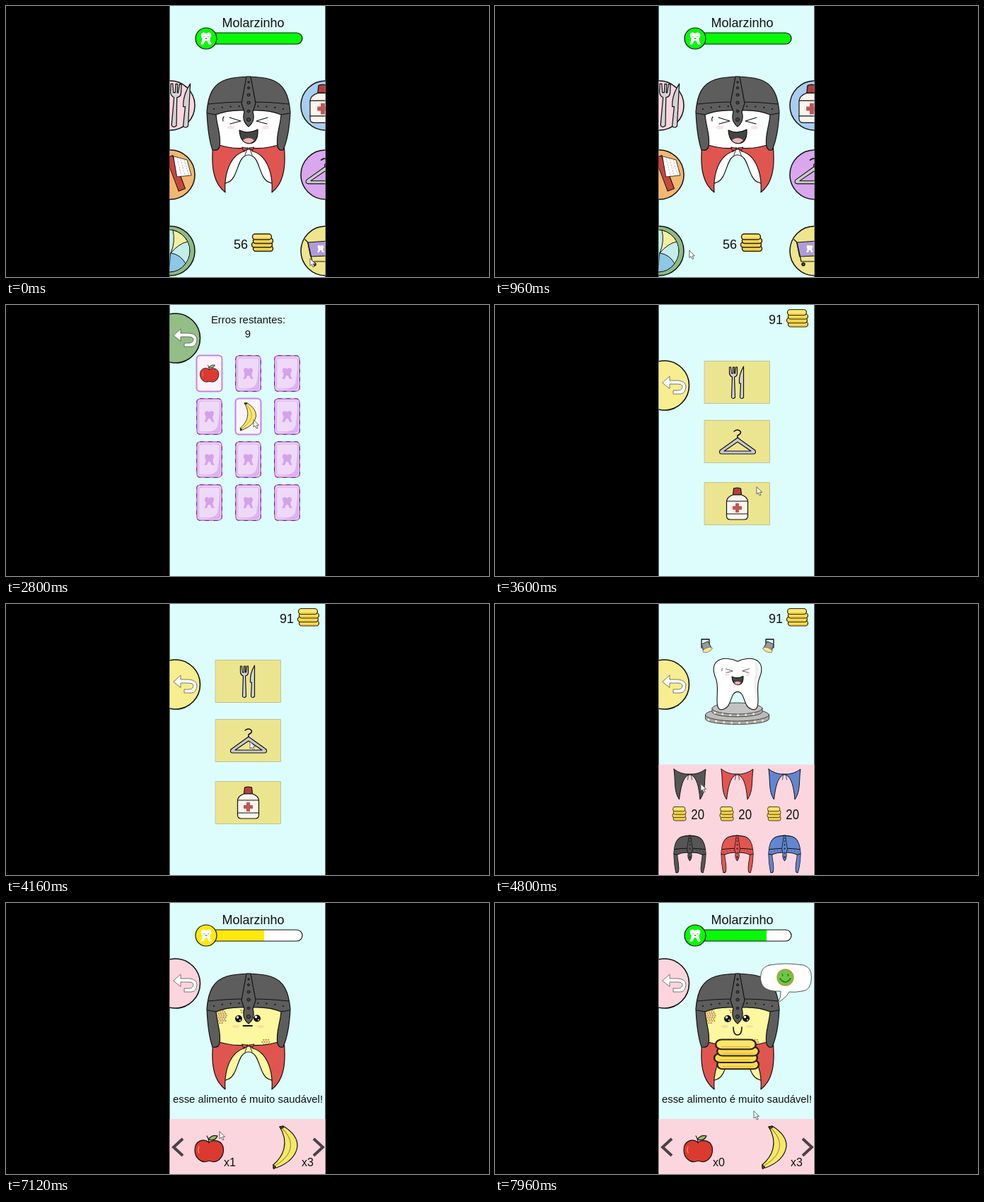
Recreate the animation shown at these times as an HTML page. Size 683 by 384 pixels, loop 8 s.

```html
<!DOCTYPE html>
<html lang="pt">
<head>
<meta charset="utf-8">
<title>Dente virtual</title>
<style>
  html, body { margin: 0; width: 100%; height: 100%; overflow: hidden; background: #000; }
  svg { display: block; width: 100vw; height: 100vh; }
  text { font: 18px "Liberation Sans", Arial, sans-serif; fill: #111; stroke: none; }
  .mid { text-anchor: middle; }
  .small { font-size: 14.9px; }
  .none { stroke: none; }
  .line { fill: none; }
</style>
</head>
<body>
<svg viewBox="0 0 683 384" stroke="#111" stroke-width="1.2" stroke-linejoin="round" stroke-linecap="round">
<defs>
  <clipPath id="phone"><path d="M231.500 0h220v384h-220z"/></clipPath>

  <path id="body" d="M343 141C330 134 312 132 300 138C286 145 285 162 293 180C300 197 295 215 296 236C297 252 303 255 313 250C329 246 326 211 343 211C360 211 357 246 373 250C383 255 389 252 390 236C391 215 386 197 393 180C401 162 400 145 386 138C374 132 356 134 343 141Z"/>
  <path id="mini" class="none" d="M0 -7Q-4 -10-7 -7Q-8 -3-5.500 0Q-5 4-8 8Q-4 10-3 7Q-2 3 0 3Q2 3 3 7Q4 10 8 8Q5 4 5.500 0Q8 -3 7 -7Q4 -10 0 -7Z"/>

  <g id="cape" fill="currentColor">
    <path id="capeSide" d="M293 194Q318 204 342 201L337 206C318 211 308 236 310 264C292 250 290 225 293 194Z"/>
    <use href="#capeSide" transform="matrix(-1 0 0 1 686 0)"/>
    <path d="M334 200l8 2 9-2-2 4-6-1-7 2zM341 203l-3 8M345 203l3 8" stroke-width=".9"/>
  </g>

  <g id="helmet" fill="currentColor">
    <path d="M284 150C286 125 293 110 312 104C330 99 356 99 374 104C394 110 400 128 402 150C401 172 398 190 392 204Q386 206 384 199C381 185 388 170 389 154Q372 147 350 148H336Q314 147 297 154C298 170 305 185 302 199Q300 206 292 204C287 190 285 172 284 150Z"/>
    <path class="line" d="M286 139Q312 136 335 136M351 136Q374 136 400 139M285 152l12 2M401 152l-12 2"/>
    <path d="M340 100h6L353 138L349 150Q353 163 343 171Q333 163 337 150L333 138Z"/>
    <g fill="#444" stroke-width=".9">
      <circle cx="343" cy="108" r="1.2"/><circle cx="343" cy="116" r="1.6"/><circle cx="343" cy="126" r="2"/>
      <circle cx="343" cy="137" r="2.200"/><circle cx="343" cy="149" r="1.8"/><circle cx="343" cy="161" r="2.600"/>
      <path class="line" stroke-width="2.200" stroke-dasharray="0 12" d="M294 146Q312 142 333 142M392 146Q374 142 353 142"/>
    </g>
  </g>

  <g id="laugh">
    <path class="line" d="M316 158l16 5-15 4M370 158l-16 5 15 4M307 163q-1-4 1-6" stroke-width="1.1"/>
    <g class="none" fill="#fde0e3"><ellipse cx="318" cy="172" rx="5" ry="2.6"/><ellipse cx="367" cy="172" rx="5" ry="2.6"/></g>
    <path fill="#444" d="M330 176Q343 182 356 175Q357 194 344 195Q331 194 330 176Z"/>
    <path class="none" fill="#f3b5b5" d="M335 190Q343 184 351 190Q347 195 343 194Q338 194 335 190Z"/>
  </g>

  <g id="eyes" class="none">
    <circle cx="329" cy="164" r="5" fill="#111"/><circle cx="355" cy="163.500" r="5" fill="#111"/>
    <g fill="#fff"><circle cx="327.500" cy="162" r="1.700"/><circle cx="353.500" cy="161.500" r="1.700"/><circle cx="331" cy="166" r="1"/><circle cx="357" cy="165.500" r="1"/></g>
    <g fill="#f6e0a0"><ellipse cx="325" cy="175" rx="5" ry="2"/><ellipse cx="360" cy="175" rx="5" ry="2"/></g>
  </g>

  <g id="coins" fill="#f7dc55" stroke="#2c2208">
    <rect x="-13" y="5" width="28" height="7.500" rx="3.700"/>
    <rect x="-15" y="-.5" width="29" height="7.500" rx="3.700"/>
    <rect x="-13" y="-6" width="28" height="7.500" rx="3.700"/>
    <rect x="-14" y="-12" width="27" height="8" rx="4" fill="#fae56c"/>
    <path class="line" stroke="#eeb53c" stroke-width=".8" d="M-9 10.500h20M-11 5h20M-9 -.5h20M-10 -6h19"/>
  </g>

  <g id="cutlery" fill="#d3d3d6">
    <path d="M-12 -22v9q1 4 4 5l-1 29q2 3 5 0l-1-29q4-1 4-5v-9l-2 0-1 9-1 0v-9h-2v9h-2l-1-9z"/>
    <path d="M8 -23q-7 12-6 24h2l-1 20q2 3 5 0z"/>
  </g>
  <g id="hanger">
    <path fill="#c9c9cc" fill-rule="evenodd" d="M0 -6L25 12Q27 17 22 17H-22Q-27 17-25 12ZM0 0L-19 13H19Z"/>
    <path class="line" stroke-width="1.600" d="M0 -6v-3q6-3 4-6-4-4-9 0"/>
  </g>
  <g id="bottle">
    <path fill="#b5403f" d="M-5 -22Q0 -24 5 -22L6 -13H-6Z"/>
    <path fill="#fbf6ee" d="M-6 -13H6Q15 -10 15 -3V17Q15 22 10 22H-10Q-15 22-15 17V-3Q-15 -10-6 -13Z"/>
    <path class="line" d="M-15 -4h30M-15 14h30"/>
    <path class="none" fill="#c25656" d="M-2.500 -1h5v4h4v5h-4v4h-5v-4h-4v-5h4z"/>
  </g>
  <g id="apple">
    <path fill="#db3a30" d="M0 -9C-8 -15-20 -11-20 2C-20 13-11 21-2 18Q0 17 3 18C12 21 21 12 20.500 1C20 -11 8 -14 0 -9Z"/>
    <path class="line" d="M0 -8Q0 -14-3 -18"/>
    <path fill="#8fca62" d="M-1 -13Q4 -20 12 -18Q9 -10-1 -13Z"/>
    <path class="line" stroke="#f08a7c" d="M-14 -3q-2 5 0 9"/>
  </g>
  <g id="banana">
    <path fill="#f6e86a" d="M-8 -29L-3 -30Q18 -17 17 -1Q14 19-12 29L-17 30L-17 25C-3 13 6 -6-8 -29Z"/>
    <path class="line" stroke="#a89530" d="M-5 -27Q15 -8 3 11Q-4 20-14 26"/>
    <path fill="#4b3d1c" stroke-width=".8" d="M-17 25l4 3-3 3zM-8 -29l5-1 1 2-4 2z"/>
  </g>

  <g id="back">
    <circle r="35" cx="-.5" fill="currentColor" stroke-width="1.600"/>
    <path fill="#fff" stroke="#444" stroke-width=".7" d="M-3 -4L7 -13V-7H19Q30 -6 30 2Q29 12 22 12H12V7H20Q25 6 25 1Q24 -2 19 -2H7V4Z"/>
  </g>

  <g id="capeItem" fill="currentColor" stroke-width="1">
    <path d="M-22.500 -21Q-12 -13 0 -14Q12 -13 22.500 -21C20 -4 23 10 14.500 22C13 5 10 -9 2 -13H-2C-10 -9-13 5-15 22C-23 10-20 -4-22.500 -21Z"/>
    <path class="line" stroke-width=".7" d="M-2 -13l-1 7M2 -13l1 7"/>
  </g>
  <g id="price"><g transform="scale(.8 1)"><use href="#coins" transform="scale(.8)"/><text x="21" y="8" style="font-size:21px">20</text></g></g>

  <g id="lamp">
    <path class="line" stroke-width="1.300" d="M292 62V50h11v9"/>
    <path fill="#999" stroke="#444" d="M292 57l9-4 5 9-11 5z"/>
    <ellipse cx="300.500" cy="65" rx="7" ry="3" fill="#fbe58e" stroke="#777" stroke-width=".8" transform="rotate(-22 300.500 65)"/>
  </g>
  <g id="cardBack">
    <rect x="-17.500" y="-25" width="35" height="50" rx="5" fill="#efd9f8" stroke="#c583df" stroke-width="2"/>
    <rect x="-18" y="-25.500" width="36" height="51" rx="5" class="line" stroke="#4a3155" stroke-width=".8" stroke-dasharray="5 7"/>
    <path class="none" fill="#deb4f0" d="M15.500 -12V20Q14 24 8 23H-6Q11 21 12 12Z"/>
    <rect x="-15" y="-22" width="30" height="44" rx="3" class="line" stroke="#d29bea" stroke-width=".8"/>
    <use href="#mini" transform="scale(.9)" fill="#d3a2eb"/>
  </g>
</defs>

<rect width="683" height="384" class="none"/>
<g clip-path="url(#phone)">
  <path class="none" fill="#dcfdfb" d="M231 0h221v384h-221z"/>

  <!-- home -->
  <g data-t="0 1440" stroke-width="1.500">
    <circle cx="232" cy="141" r="35" fill="#fad6df"/><use href="#cutlery" transform="translate(248 141) rotate(3) scale(1.37)" stroke-width=".9"/>
    <circle cx="232" cy="239" r="35" fill="#f3b870"/>
    <path class="line" d="M231 213L249 261" stroke-width="11" stroke-linecap="butt"/>
    <path class="line" d="M231 214L248.600 260" stroke="#c5473f" stroke-width="9" stroke-linecap="butt"/>
    <path fill="#fff" stroke-width=".8" d="M237 213l19 5 6 22-20 2z"/>
    <path class="line" stroke="#aaa" stroke-width=".8" stroke-dasharray="2 2" d="M242 216l6 24M247 217l6 23M252 218l6 21"/>
    <circle cx="232" cy="347" r="35" fill="#8dbb84"/>
    <g stroke-width="1">
      <circle cx="230" cy="347" r="30" fill="#c4eee9"/>
      <path fill="#f3efa2" d="M236 317.600Q250 321 257 334Q245 336 233 350Q240 334 236 317.600Z"/>
      <path fill="#8ec7e8" d="M233 350Q247 352 254 365Q245 377 231 377Z"/>
    </g>
    <circle cx="452" cy="141" r="35" fill="#a9cdef"/><use href="#bottle" transform="translate(448 139) scale(1.2)" stroke-width="1"/>
    <circle cx="452" cy="239" r="35" fill="#d9a7ed"/><use href="#hanger" transform="translate(451 234) scale(1.05)" stroke-width="1"/>
    <circle cx="452" cy="347" r="35" fill="#efe58d"/>
    <path fill="#b09bd8" stroke-width="1" d="M427 335l28-2v21l-24 1z"/>
    <path class="line" stroke-width="1.200" d="M423 331l4 4 6 27h22"/>
    <circle cx="436" cy="366" r="2" fill="#555"/>
    <use href="#mini" transform="translate(445 344) scale(.6)" fill="#fff"/>
    <text x="322" y="343.500">56</text><use href="#coins" transform="translate(362.500 335)"/>
  </g>

  <!-- memory game -->
  <g data-t="1440 3240">
    <use href="#back" x="240" y="47" color="#93be86"/>
    <text class="mid small" x="342.500" y="25.500">Erros restantes:</text>
    <text class="mid small" x="342" y="46" id="errors">9</text>
    <g id="cards"></g>
  </g>

  <!-- shops -->
  <g data-t="3240 6560">
    <use href="#back" x="240" y="114" color="#f6ee8f"/>
    <text x="387" y="26.500">91</text><use href="#coins" transform="translate(427.500 18.500)"/>
  </g>
  <g data-t="3240 4240">
    <path fill="#ece58f" stroke="#b5b58c" stroke-width=".8" d="M296.500 79.500h92v60h-92zM296.500 163.500h92v60h-92zM296.500 251.500h92v60h-92z"/>
    <use href="#cutlery" transform="translate(343.500 110)"/><use href="#hanger" x="343" y="194"/><use href="#bottle" x="342.500" y="282"/>
  </g>
  <g data-t="4240 6560">
    <path class="none" fill="#fcd6df" d="M231 227.500h221V384h-221z"/>
    <use href="#lamp"/><use href="#lamp" transform="matrix(-1 0 0 1 686 0)"/>
    <g fill="#aaa" stroke="#444" stroke-width="1">
      <path d="M297.500 157v6c3 10 87 10 90 0v-6z"/><ellipse cx="342.500" cy="157" rx="45" ry="9" fill="#bcbcbc"/>
      <path d="M307 148v5c3 9 68 9 71 0v-5z"/><ellipse cx="342.500" cy="148" rx="35.500" ry="8" fill="#c2c2c2"/>
      <g class="line" stroke="#fff3bd" stroke-width="3" stroke-dasharray="0 11"><path d="M302 164Q342 173 384 164"/><path d="M311 154Q342 161 375 154"/></g>
    </g>
    <g transform="translate(343 157) scale(.615) translate(-343 -264)" stroke-width="1.800">
      <use href="#body" fill="#fff"/>
      <path class="none" fill="#efefef" d="M382 141Q398 150 388 180Q384 200 386 235Q378 190 384 170Z"/>
      <use href="#laugh"/>
      <use href="#cape" color="#4f4f4f" data-t="5080 6560"/>
    </g>
    <g data-t="5080 6560">
      <path fill="#efe78f" stroke-width="1.600" d="M301 191.500h83v21.500h-83z"/>
      <text class="mid" x="342.500" y="206.500" style="font-size:12.6px;fill:#444">Comprar</text>
    </g>
    <g id="wardrobe"></g>
    <path data-t="5080 6560" fill="#1fd51f" stroke="#145c14" stroke-width=".8" d="M283 270l3-2 4 4q4-9 12-13-7 8-11 18z"/>
  </g>

  <!-- feeding -->
  <g data-t="6560 8000">
    <use href="#back" x="240" y="114" color="#fcd5df"/>
    <path class="none" fill="#fcd6df" d="M231 306h221v78h-221z"/>
    <text class="mid" style="font-size:14.85px" x="342" y="282.500">esse alimento é muito saudável!</text>
    <path class="line" stroke="#4a4348" stroke-width="4" stroke-linecap="butt" stroke-linejoin="miter" d="M250 334L237 346L250 358M435 334L448 346L435 358"/>
    <use href="#apple" x="287" y="348"/><use href="#banana" x="395" y="346"/>
    <text style="font-size:16px" x="308" y="373" id="appleCount">x1</text><text style="font-size:16px" x="418" y="373">x3</text>
  </g>

  <!-- character and health bar -->
  <g data-t="0 1440,6560 8000">
    <text class="mid" x="349.500" y="30">Molarzinho</text>
    <rect x="275" y="38" width="144" height="16" rx="8" fill="#fff" class="none"/>
    <path id="health" class="none"/>
    <rect x="275" y="38" width="144" height="16" rx="8" class="line"/>
    <circle id="badge" cx="283" cy="46" r="15"/>
    <use href="#mini" x="283" y="46" fill="#fff"/>
    <path class="line" stroke-width=".9" d="M280 43.500h.1M286 43.500h.1M282 46h2"/>
    <use href="#body" id="skin"/>
    <use href="#laugh" data-t="0 1440"/>
    <g data-t="6560 8000">
      <path class="line" stroke="#bd8f58" stroke-width="2" stroke-dasharray=".6 2.700" d="M300 152h9M299 154.500h13M297 157h16M298 159.500h16M297 162h16M299 164.500h13M300 167h11M302 170h6M332 152h8M333 155h6M364 194h9M362 197h13M364 200h9"/>
      <use href="#eyes"/>
      <path class="line" stroke-width="1.800" d="M335.500 174h12.500" data-t="6560 7600"/>
      <path class="line" stroke-width="1.600" d="M337 176Q337 187 343 187Q349 187 349 176" data-t="7600 8000"/>
    </g>
    <use href="#cape" color="#e05550"/>
    <use href="#helmet" color="#5d5d5d"/>
  </g>
  <g data-t="7600 8000">
    <path fill="#fff" stroke="#444" stroke-width=".9" d="M388 88Q411 84 436 88Q448 91 447.500 106Q447 124 434 125Q424 127 416 126Q411 135 400 141Q405 133 404 125Q386 126 379 118Q373 109 377 97Q380 90 388 88Z"/>
    <circle cx="410.500" cy="105.500" r="11.500" fill="#69c745" stroke="#d58b32" stroke-width="1.400"/>
    <path class="line" stroke="#27671f" stroke-width="1.500" d="M403 107Q410.500 117 418 107M406.500 101v2M414.500 101v2"/>
  </g>
  <use href="#coins" id="reward"/>
  <use href="#apple" id="bite"/>
  <path id="cursor" fill="#fff" stroke="#555" stroke-width=".9" d="M0 0V10L2.300 8L4.200 12L6 11.200L4.200 7.300H7.200Z"/>
</g>
</svg>
<script>
const LOOP = 8000, GRAB = 7260, EAT = 7600;
const $ = id => document.getElementById(id);
const clamp = v => Math.max(0, Math.min(1, v));
const ease = v => v * v * (3 - 2 * v);

// card index: picture, time it opens, time it closes
const flips = { 0: ['apple', 2200, 2860], 4: ['banana', 2540, 2860] };
$('cards').innerHTML = Array.from({ length: 12 }, (_, i) =>
  `<g><use href="#cardBack"/>${flips[i] ? `<g><rect x="-18" y="-25.500" width="36" height="51" rx="5" fill="#fbf3fe" stroke="#c583df" stroke-width="2"/><use href="#${flips[i][0]}" transform="scale(.65)"/></g>` : ''}</g>`).join('');
const cards = [...$('cards').children];

$('wardrobe').innerHTML = ['#565656', '#e35551', '#6286cf'].map((color, i) => {
  const x = 275.5 + 67 * i;
  return `<g color="${color}"><use href="#capeItem" x="${x}" y="255"/><use href="#price" x="${x - 15}" y="297"/>
    <use href="#helmet" transform="translate(${x} 328) scale(.385 .505) translate(-343 -100)" stroke-width="2"/></g>`;
}).join('');

// time, x, y
const route = [
  [0, 430, 358], [480, 430, 358], [1100, 252, 345], [1440, 252, 345], [1760, 301, 112],
  [2200, 290, 100], [2500, 345, 158], [2960, 352, 165], [3240, 380, 300], [3600, 370, 258],
  [3960, 345, 195], [4240, 345, 195], [4800, 291, 255], [5840, 295, 258], [6360, 342, 202],
  [6560, 342, 202], [7120, 302, 324], [GRAB, 292, 344], [EAT, 343, 185], [7960, 366, 295], [8000, 366, 295]
];
function cursorAt(t) {
  const i = route.findIndex(p => p[0] > t), [t0, x0, y0] = route[i - 1], [t1, x1, y1] = route[i];
  const k = ease((t - t0) / (t1 - t0));
  return [x0 + (x1 - x0) * k, y0 + (y1 - y0) * k];
}

const timed = [...document.querySelectorAll('[data-t]')].map(el =>
  [el, el.dataset.t.split(',').map(span => span.split(' ').map(Number))]);
const show = (el, on) => { el.style.display = on ? '' : 'none'; };

function draw(t) {
  for (const [el, spans] of timed) show(el, spans.some(([a, b]) => t >= a && t < b));

  cards.forEach((card, i) => {
    let turn = 0;
    if (flips[i]) {
      const [, open, close] = flips[i];
      turn = clamp((t - open) / 200) - clamp((t - close) / 200);
      show(card.children[1], turn > .5);
    }
    const x = 287.5 + 55 * (i % 3), y = 97 + 61 * Math.floor(i / 3);
    card.setAttribute('transform', `translate(${x} ${y}) scale(${Math.abs(Math.cos(Math.PI * turn))} 1)`);
  });
  $('errors').textContent = t < 2860 ? 9 : 8;

  const home = t < 1440, fed = t >= EAT;
  const color = home || fed ? '#08fa08' : '#ffe90c';
  const end = home ? 411 : 365 + 19 * ease(clamp((t - EAT) / 160));
  $('health').setAttribute('d', `M283 38H${end}${home ? 'a8 8 0 0 1 0 16' : 'v16'}H283z`);
  $('health').setAttribute('fill', color);
  $('badge').setAttribute('fill', color);
  $('skin').setAttribute('fill', home ? '#fff' : '#fdf89f');
  $('appleCount').textContent = fed ? 'x0' : 'x1';

  const [x, y] = cursorAt(t);
  $('cursor').setAttribute('transform', `translate(${x} ${y})`);
  show($('bite'), t >= GRAB && t < EAT);
  $('bite').setAttribute('transform', `translate(${x} ${y + 3})`);

  const pop = ease(clamp((t - EAT - 60) / 160));
  show($('reward'), pop > 0);
  $('reward').setAttribute('transform', `translate(341.5 214) scale(${2.1 * pop} ${1.7 * pop})`);
}

const start = performance.now();
(function tick() {
  draw((performance.now() - start) % LOOP);
  requestAnimationFrame(tick);
})();
</script>
</body>
</html>
```
